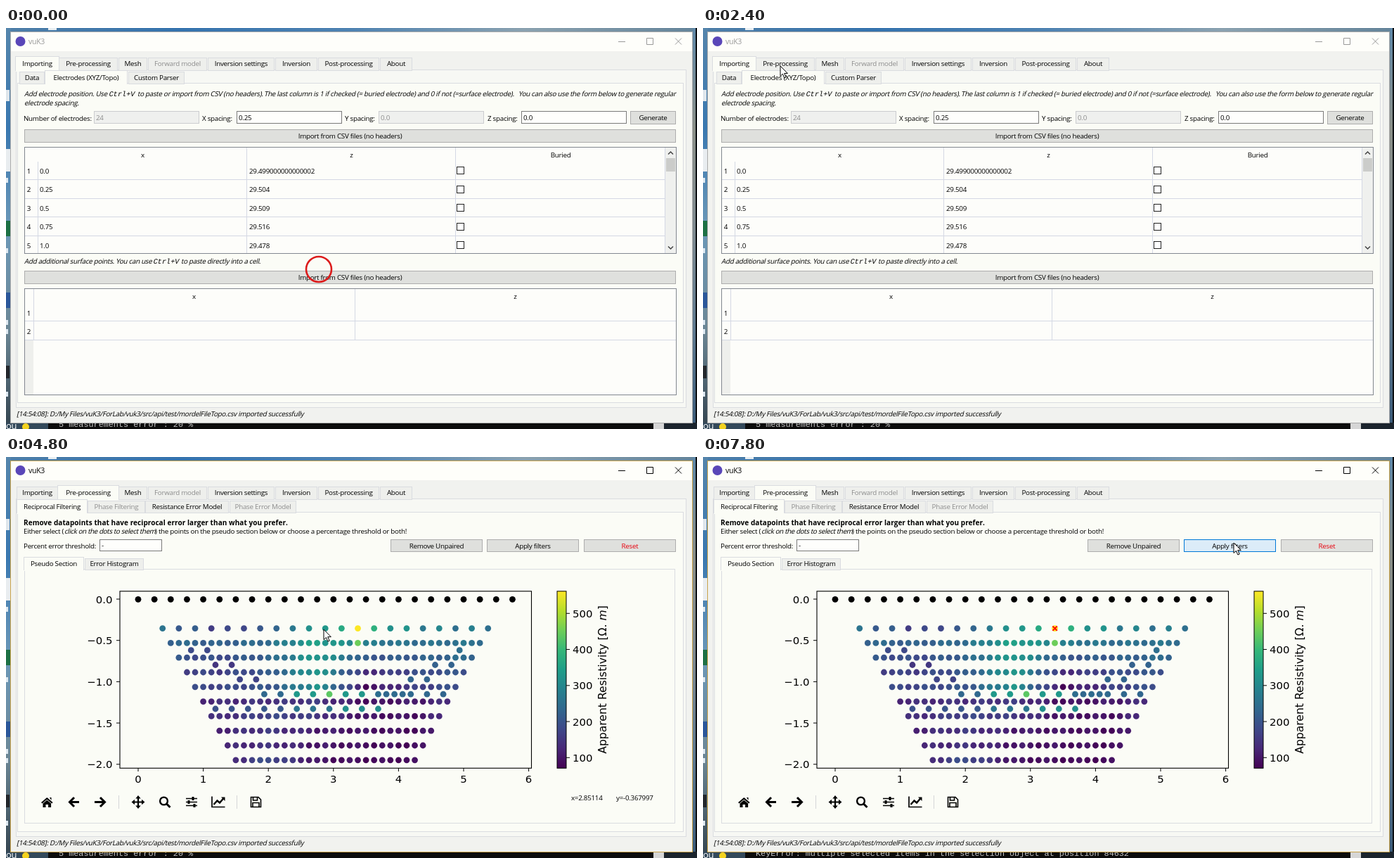
Animation, 983 px wide and 570 px high, one loop 8 s. Source, as an HTML page:

```html
<!DOCTYPE html>
<html lang="en">
<head>
<meta charset="utf-8">
<title>Pre-processing demo</title>
<style>
html, body { margin: 0; width: 100%; height: 100%; overflow: hidden; background: #fff; }
svg { display: block; width: 100%; height: 100%; }
text { font: 9.8px "Open Sans", sans-serif; letter-spacing: -.27px; white-space: pre; }
.bold { font-weight: 700; font-size: 10px; letter-spacing: .06px; }
.tight { letter-spacing: -.36px; }
.mono { font: 10.2px "Liberation Mono", monospace; letter-spacing: 0; }
.term { font: 11.8px "Liberation Mono", monospace; letter-spacing: 0; }
.plot { font: 14.9px "DejaVu Sans", sans-serif; letter-spacing: 0; }
.title { font-size: 10.5px; }
.mid { text-anchor: middle; }
.end { text-anchor: end; }
.dim { fill: #8d8d8d; }
</style>
</head>
<body>
<svg id="stage" viewBox="0 0 983 570" preserveAspectRatio="none"></svg>
<script>
const PANE = '#fbfcf6', FACE = '#f1f2ef', EDGE = '#dadce0', GRID = '#d4d8e4', BUTTON = '#dfe0dd';
const LOOP = 8000, STEP = 200;

// ---- markup helpers ----
const rect = (x, y, w, h, fill, stroke, extra = '') =>
  `<rect x="${x}" y="${y}" width="${w}" height="${h}" fill="${fill}" ${stroke ? `stroke="${stroke}"` : ''} ${extra}/>`;
const path = (d, stroke = '#000', width = 1, fill = 'none') =>
  `<path d="${d}" stroke="${stroke}" stroke-width="${width}" fill="${fill}"/>`;
const solid = d => path(d, 'none', 0, '#000');
const text = (x, y, str, cls = '', extra = '') => `<text x="${x}" y="${y}" class="${cls}" ${extra}>${str}</text>`;
const oblique = (x, y, str, cls = '') =>
  text(0, 0, str, cls, `transform="translate(${x} ${y}) skewX(-13)"`);
const dot = (x, y, fill) => `<circle cx="${x}" cy="${y}" r="4.4" fill="${fill}"/>`;
const group = (id, body, extra = '') => `<g id="${id}" ${extra}>${body}</g>`;

const button = (x, y, w, h, label, color = '#000', id = '') =>
  rect(x + .5, y + .5, w - 1, h - 1, BUTTON, '#adadad', id && `id="${id}"`) +
  text(x + w / 2, y + h / 2 + 3.6, label, 'mid', `fill="${color}"`);
const field = (x, y, w, h, value, off) =>
  rect(x + .5, y + .5, w - 1, h - 1, off ? '#eff0ee' : '#fefefc', off ? '#cbcccf' : '#7a7a7a') +
  text(x + 3, y + h / 2 + 3.6, value, off ? 'dim' : '');

// A tab is [left, right, label, disabled]; the selected one is drawn last and a bit larger.
function tabs(top, bottom, selected, list) {
  const draw = ([l, r, label, off], i) => {
    const on = i === selected, grow = on ? 2 : 0;
    return rect(l - grow + .5, top - grow + 1.5, r - l + 2 * grow - 1, bottom - top + grow, on ? PANE : '#eeefec', EDGE) +
      (on ? rect(l - 1, bottom, r - l + 2, 3, PANE) : '') +
      text((l + r) / 2, (top + bottom) / 2 + 4.2, label, off ? 'mid dim' : 'mid');
  };
  const marks = list.map(draw);
  return marks.filter((_, i) => i !== selected).join('') + marks[selected];
}

const mainTabs = selected => tabs(41, 59, selected, [
  [15, 74, 'Importing'], [75, 159, 'Pre-processing'], [160, 201, 'Mesh'], [202, 286, 'Forward model', true],
  [287, 382, 'Inversion settings'], [383, 443, 'Inversion'], [444, 531, 'Post-processing'], [532, 578, 'About']]);

// ---- import page ----
function importPage() {
  let s = rect(16.5, 78.5, 947, 454, PANE, EDGE);
  s += oblique(26, 97, 'Add electrode position. Use') + oblique(146, 97, 'Ctrl+V', 'mono') +
    oblique(187, 97, 'to paste or import from CSV (no headers).') +
    oblique(367, 97, 'The last column is 1 if checked (= buried electrode) and 0 if not (=surface electrode).') +
    oblique(729, 97, 'You can also use the form below to generate regular') +
    oblique(26, 110, 'electrode spacing.');
  [[25, 125, 'Number of electrodes:', '24', true], [279, 328, 'X spacing:', '0.25'],
   [482, 530, 'Y spacing:', '0.0', true], [685, 733, 'Z spacing:', '0.0']].forEach(([x, fx, label, value, off]) => {
    s += text(x, 131.5, label) + field(fx, 118, 150, 18, value, off);
  });
  s += button(888, 118, 65, 19, 'Generate') + button(26, 144, 927, 19, 'Import from CSV files (no headers)');

  s += rect(26.5, 169.5, 927, 151, '#fdfdfa', '#828790');
  s += text(194.5, 184, 'x', 'mid') + text(491.5, 184, 'z', 'mid') + text(789, 184, 'Buried', 'mid');
  s += path('M342.5 170V320M639.5 170V320M45.5 190V320M937.5 170V320', GRID);
  ['29.499000000000002', '29.504', '29.509', '29.516', '29.478'].forEach((z, i) => {
    const y = 206.5 + 26.5 * i, x = i * .25;
    s += text(32.5, y, i + 1, 'mid') + text(48, y, i % 2 ? x : x.toFixed(1)) + text(346, y, z);
    s += rect(641.5, Math.floor(y - 9) + .5, 10, 10, '#fff', '#222');
    if (i < 4) s += path(`M27 ${Math.floor(y + 9) + .5}H937`, GRID);
  });
  s += rect(938, 170, 15, 150, '#eff0ee') + rect(939, 185, 13, 19, '#cbccca') +
    path('M942 179.5l3.5-3.5 3.5 3.5M942 310.5l3.5 3.5 3.5-3.5', '#444', 1.5);

  s += oblique(26, 335, 'Add additional surface points. You can use') + oblique(209, 335, 'Ctrl+V', 'mono') +
    oblique(249, 335, 'to paste directly into a cell.');
  s += button(26, 345, 927, 19, 'Import from CSV files (no headers)');
  s += rect(26.5, 370.5, 927, 151, '#fdfdfa', '#828790') + rect(27, 444, 12, 77, '#eeefec');
  s += text(267.5, 385, 'x', 'mid') + text(724.5, 385, 'z', 'mid') +
    text(32.5, 408.5, 1, 'mid') + text(32.5, 435, 2, 'mid');
  return s + path('M496.5 371V443M39.5 371V443M27 416.5H953M27 443.5H953', GRID);
}

// ---- pseudo section plot ----
const px = x => 188 + 92.6 * x, py = y => 202 - 117.4 * y;
const viridis = ['440154', '482878', '3e4989', '31688e', '26828e', '1f9e89', '35b779', '6ece58', 'b5de2b', 'fde725']
  .map(h => [0, 2, 4].map(i => parseInt(h.slice(i, i + 2), 16)));
const mix = (a, b, f) => a + (b - a) * f;
function colour(value) {
  const p = Math.min(.9999, Math.max(0, (value - 71) / 490)) * 9, i = Math.floor(p);
  return `rgb(${viridis[i].map((c, k) => Math.round(mix(c, viridis[i + 1][k], p - i)))})`;
}

// Resistivity per depth row, sampled every 0.75 from x = 0.5.
const rows = [
  [240, 160, 210, 330, 380, 290, 265], [235, 220, 245, 350, 275, 250, 255],
  [200, 185, 225, 340, 205, 215, 240], [175, 165, 205, 335, 130, 185, 200],
  [180, 175, 200, 320, 85, 160, 200], [125, 130, 140, 150, 85, 105, 145],
  [135, 130, 175, 150, 95, 90, 160], [130, 120, 150, 110, 95, 85, 125],
  [110, 115, 140, 100, 88, 82, 110], [110, 105, 190, 95, 82, 80, 85]];
function resistivity(row, x) {
  if (x === 3.375 && row < 2) return row ? 450 : 560;
  const p = Math.min(5.999, Math.max(0, (x - .5) / .75)), i = Math.floor(p);
  return mix(rows[row][i], rows[row][i + 1], p - i) + (row ? 14 : 20) * Math.sin(x * 37 + row * 5);
}

function plot() {
  let s = '';
  for (let i = 0; i < 24; i++) s += dot(px(i * .25), 202.3, '#000');
  rows.forEach((_, k) => {
    const first = .375 + k * .125;
    for (let x = first; x <= 5.75 - first; x += k ? .125 : .25) s += dot(px(x), 243.6 + 20.8 * k, colour(resistivity(k, x)));
  });
  // Scattered points between the regular rows: [y, eighths of x, base value]
  [[274.7, [6.5, 8.5], 175], [274.7, [39.5], 260], [295.5, [9.5, 11.5], 150], [295.5, [36.5, 38.5], 215],
   [316.2, [12.5, 14.5], 175], [316.2, [33.5, 35.5], 230], [337.2, [15.5, 17.5], 225],
   [337.2, [19.5, 21.5, 25.5, 27.5], 320], [337.2, [23.5], 420], [337.2, [29.5, 30.5, 31.5, 32.5, 33.5, 35.5, 37.5], 240],
   [358, [9.5, 11.5, 13.5, 15.5, 17.5], 195], [358, [19.5, 21.5, 23.5], 245], [358, [25.5, 27.5, 29.5], 300]]
    .forEach(([y, xs, v]) => xs.forEach(x => s += dot(px(x / 8), y, colour(v + 15 * Math.sin(x * 3)))));

  s += rect(162, 190.8, 585.5, 251.5, 'none', '#000', 'stroke-width="1.1"');
  for (let i = 0; i <= 6; i++) s += path(`M${px(i)} 442v5`) + text(px(i), 462.5, i, 'plot mid');
  for (let i = 0; i <= 4; i++) {
    const y = py(-i / 2);
    s += path(`M157 ${y}h5`) + text(151.5, y + 5.6, (i ? '−' : '') + (i / 2).toFixed(1), 'plot end');
  }
  s += rect(784, 190.8, 13, 251.5, 'url(#scale)', '#000');
  for (let v = 100; v <= 500; v += 100) {
    const y = 427.3 - (v - 100) * .5125;
    s += path(`M797 ${y}h5`) + text(806, y + 5.6, v, 'plot');
  }
  return s + text(0, 0, 'Apparent Resistivity [Ω. <tspan font-style="italic">m</tspan>]', 'plot mid',
    'transform="translate(854 316.5) rotate(-90)" style="font-size:15.6px"');
}

function toolbar() {
  return solid('M50 491l8.3-7 8.3 7-1.5 1.5-6.8-5.7-6.8 5.7zM52.5 492.5l5.8-4.8 5.8 4.8V498h-4v-4h-3.6v4h-4zM62 484h2.5v4z') +
    path('M104 490.5H91M97 484l-6.5 6.5 6.5 6.5M126 490.5h13M134 484l6.5 6.5-6.5 6.5', '#000', 3) +
    path('M188 484v13M181.5 490.5h13', '#000', 2.2) +
    solid('M188 481l3.7 4.5h-7.4zM188 500l3.7-4.5h-7.4zM178.5 490.5l4.5-3.7v7.4zM197.5 490.5l-4.5-3.7v7.4z') +
    '<circle cx="224.5" cy="489" r="5.4" fill="none" stroke="#000" stroke-width="2.4"/>' + path('M228.5 493l5 5', '#000', 3) +
    path('M256 485.5h16M256 490.5h16M256 495.5h16', '#000', 1.7) +
    path('M266 483v5M260 488v5M268 493v5', '#000', 3) +
    path('M293 482.5V497.5h18.5', '#000', 1.7) + path('M295.5 494l5-5.5 3.5 3 6-7', '#000', 2.4) +
    solid('M306 483.5h5.5v5.5z') +
    path('M348.5 483.5h10.5l3.5 3.5v10.5h-14zM351.5 483.5v4.5h6v-4.5M351 497v-5.5h9v5.5', '#000', 1.6) +
    path('M160.5 481V500M328.5 481V500', '#d5d6d8');
}

function processPage() {
  return rect(16.5, 78.5, 947, 454, PANE, EDGE) + tabs(61, 78, 0, [
    [17, 114, 'Reciprocal Filtering'], [116, 198, 'Phase Filtering', true],
    [198, 317, 'Resistance Error Model'], [318, 413, 'Phase Error Model', true]]) +
    text(25, 97, 'Remove datapoints that have reciprocal error larger than what you prefer.', 'bold') +
    text(25, 108.5, 'Either select (') + oblique(83, 108.5, 'click on the dots to select them', 'tight') +
    text(212, 108.5, ') the points on the pseudo section below or choose a percentage threshold or both!') +
    text(25, 130, 'Percent error threshold:') + field(133, 117, 89, 17, '-') +
    button(547, 117, 131, 18, 'Remove Unpaired') + button(684, 117, 131, 18, 'Apply filters', '#000', 'apply') +
    button(822, 117, 131, 18, 'Reset', '#e8000d') +
    rect(26.5, 159.5, 925, 361, PANE, EDGE) +
    tabs(143, 159, 0, [[27, 109, 'Pseudo Section'], [112, 196, 'Error Histogram']]) + toolbar();
}

function desktop() {
  return rect(0, 0, 983, 570, 'url(#sky)') + rect(60, 0, 12, 3, '#e8eef2') +
    rect(0, 0, 7, 570, 'url(#side)') + rect(977, 0, 4, 570, 'url(#shore)') + rect(981, 0, 2, 570, '#0c0f12') +
    rect(0, 88, 5, 16, '#dfe6ec') + rect(0, 172, 6, 32, '#e9edf0') + rect(0, 274, 6, 22, '#1d7044') +
    rect(0, 376, 6, 22, '#2b579a') + rect(0, 480, 5, 18, '#23272c') +
    [220, 320, 422, 435, 524].map(y => rect(0, y - 7, 3, 7, '#dfe9f2')).join('') +
    rect(0, 561, 60, 9, '#33495b') + text(0, 570, 'ou', '', 'fill="#fff" style="font-size:13px"') +
    '<circle cx="28" cy="567" r="5" fill="#f4d320"/>' +
    rect(60, 561, 861, 9, '#0c0c0c') + rect(921, 561, 15, 9, '#d6d6d6') + rect(936, 561, 47, 9, '#1b242d') +
    text(75, 566.5, '', 'term', 'id="console" fill="#c4c4c4"');
}

const stops = (...list) => list.map((c, i) => `<stop offset="${i / (list.length - 1)}" stop-color="${c}"/>`).join('');
const gradient = (id, x2, y2, ...list) => `<linearGradient id="${id}" x2="${x2}" y2="${y2}">${stops(...list)}</linearGradient>`;

const stage = document.getElementById('stage');
stage.innerHTML = `<defs>
  <linearGradient id="scale" x1="0" y1="1" x2="0" y2="0">${stops(...viridis.map(c => `rgb(${c})`))}</linearGradient>
  ${gradient('sky', 1, 0, '#4f7fa8', '#3573ae', '#4f83b2', '#8ba2b0', '#64849a')}
  ${gradient('side', 0, 1, '#5585ac', '#3a78b0', '#6c98b8', '#6c8796', '#33434f')}
  ${gradient('shore', 0, 1, '#5f88a8', '#8a8f88', '#7f8a90', '#5f7a90', '#3a5a78')}
  <clipPath id="stale"><rect x="43" y="177" width="892" height="290"/></clipPath>
</defs>` + desktop() +
  rect(6.5, 5.5, 970, 556, FACE, '#aaa', 'id="frame"') + rect(7, 6, 969, 27, '#fefefa') +
  '<circle cx="20.5" cy="19" r="7" fill="#5946b8"/>' +
  group('caption', text(32, 23, 'vuK3', 'title', 'fill="currentColor"') +
    path('M871 19.5h10M911.5 14.5h9v9h-9zM952 14.5l9 9m0-9l-9 9', 'currentColor')) +
  rect(14.5, 59.5, 953, 480, '#f7f8f4', EDGE) +
  group('importing', mainTabs(0) + importPage() + tabs(61, 78, 1, [
    [19, 55, 'Data'], [57, 171, 'Electrodes (XYZ/Topo)'], [174, 254, 'Custom Parser']])) +
  group('processing', mainTabs(1) + processPage() +
    group('leftover', importPage() + rect(26, 445, 928, 30, PANE), 'clip-path="url(#stale)"') +
    group('section', plot()) +
    group('cross', path('M497.4 240.5l6.4 6.4m0-6.4l-6.4 6.4', '#f00', 1.8)) +
    text(804, 488, '', '', 'id="readX"') + text(868, 488, '', '', 'id="readY"')) +
  oblique(15, 552, '[14:54:08]: D:/My Files/vuK3/ForLab/vuk3/src/api/test/mordelFileTopo.csv imported successfully') +
  group('cursor', path('M0 0V14.5l3.4-3.2 2.5 5.7 2.3-1-2.5-5.5h4.6z', '#000', 1, '#fff')) +
  '<circle id="ring" r="18" fill="none" stroke="#dc1c1c" stroke-width="2.6"/>';

// ---- motion ----
const el = id => document.getElementById(id);
const route = [[0, 445, 343], [1200, 445, 343], [1800, 251, 140], [2400, 110, 54], [3400, 110, 54],
  [4600, 452.0156, 245.2028], [5000, 452.0156, 245.2028], [5600, 500.5583, 244.3218],
  [6200, 500.5583, 244.3218], [7200, 755, 122], [LOOP, 755, 122]];
const clicks = [0, 2600, 6000, 7600];

function position(t) {
  const i = route.findIndex(key => key[0] > t), [t0, x0, y0] = route[i - 1], [t1, x1, y1] = route[i];
  const f = (t - t0) / (t1 - t0);
  return [mix(x0, x1, f), mix(y0, y1, f)];
}
const show = (id, on) => el(id).style.display = on ? '' : 'none';

function render(t) {
  const [x, y] = position(t), active = t >= 2600, processing = t >= 2800, drawn = t >= 3200;
  const clicked = clicks.includes(t);
  show('importing', !processing);
  show('processing', processing);
  show('leftover', !drawn);
  show('section', drawn);
  show('cross', t >= 6000);
  show('ring', clicked);
  show('cursor', !clicked);
  el('cursor').setAttribute('transform', `translate(${x} ${y})`);
  el('ring').setAttribute('cx', x);
  el('ring').setAttribute('cy', y);
  el('caption').style.color = active ? '#000' : '#999';
  el('frame').setAttribute('stroke', active ? '#c9a24a' : '#aaa');

  const inAxes = drawn && x > 162 && x < 748 && y > 191 && y < 442;
  el('readX').textContent = inAxes ? 'x=' + ((x - 188) / 92.6).toFixed(5) : '';
  el('readY').textContent = inAxes ? 'y=' + ((202 - y) / 117.4).toFixed(6) : '';
  const hover = x > 684 && x < 815 && y > 117 && y < 135;
  el('apply').setAttribute('fill', hover ? '#dcecf8' : BUTTON);
  el('apply').setAttribute('stroke', hover ? '#0078d7' : '#adadad');
  el('console').textContent = t < 6000 ? '5 measurements error : 20 %' :
    t < 7800 ? '    if lines[event.artist] is None: return self.points' :
    'KeyError: multiple selected items in the selection object at position 84632';
}

let shown = -1;
function tick() {
  const t = Math.floor(performance.now() % LOOP / STEP) * STEP;
  if (t !== shown) render(shown = t);
  requestAnimationFrame(tick);
}
tick();
</script>
</body>
</html>
```
